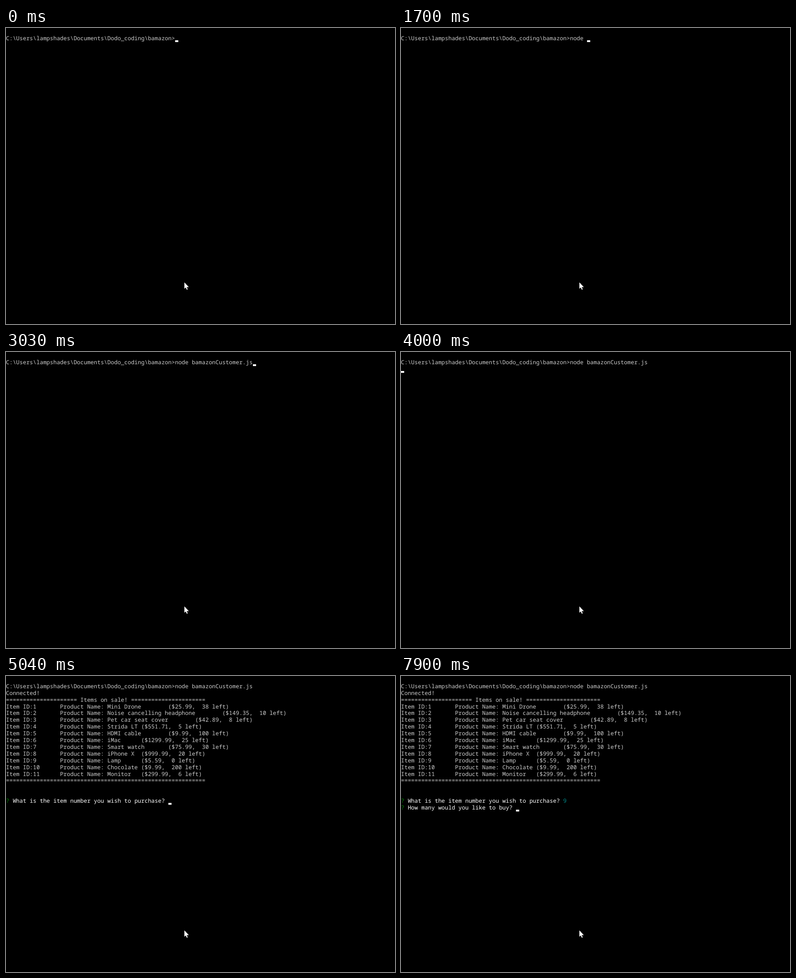
These frames come from a looping animation (857x654 px, 8 s). An HTML page:

```html
<!DOCTYPE html>
<html lang="en">
<head>
<meta charset="utf-8">
<title>Terminal session</title>
<style>
  html, body { margin: 0; width: 100%; height: 100%; overflow: hidden; background: #000; }
  #stage { position: relative; width: 857px; height: 654px; overflow: hidden; background: #000; }
  #screen {
    position: absolute; left: 0; top: 15.804px; margin: 0;
    font: 500 12.42px/14.904px "Noto Sans Mono", "DejaVu Sans Mono", monospace;
    font-variant-ligatures: none; text-rendering: geometricPrecision;
    tab-size: 8; white-space: pre; color: #ccc;
  }
  #caret {
    position: absolute; left: 0; top: 0.9px; width: 7.452px; height: 3.726px; background: #fff;
  }
  .ask { color: #fff; }
  .mark { color: #008a00; }
  .done { color: #008a8a; }
  svg { position: absolute; left: 0; top: 0; }
</style>
</head>
<body>
<div id="stage">
  <pre id="screen"><span id="prompt"></span><span id="command"></span>
<span id="connected">Connected!</span>
<span id="list"></span><span id="question"><span class="mark">?</span> <span class="ask">What is the item number you wish to purchase?</span> </span><span id="answer">9</span>
<span id="amount"><span class="mark">?</span> <span class="ask">How many would you like to buy?</span> </span></pre>
  <div id="caret"></div>
  <svg width="857" height="654">
    <path fill="#fff" d="M393 562V576L396.2 573.3 398.2 578.3 400.4 577.4 398.3 572.5H402.8Z"/>
  </svg>
</div>
<script>
const LOOP = 8000, COL = 7.452, ROW = 14.904, CARET_HEIGHT = 3.726;
const PROMPT = 'C:\\Users\\lampshades\\Documents\\Dodo_coding\\bamazon>';
const COMMAND = 'node bamazonCustomer.js';
const CONNECTED = 5000, LISTED = 5040, ANSWERED = 7140, CONFIRMED = 7800;

const items = [
  ['Mini Drone', '25.99', 38],
  ['Noise cancelling headphone', '149.35', 10],
  ['Pet car seat cover', '42.89', 8],
  ['Strida LT', '551.71', 5],
  ['HDMI cable', '9.99', 100],
  ['iMac', '1299.99', 25],
  ['Smart watch', '75.99', 30],
  ['iPhone X', '999.99', 20],
  ['Lamp', '5.59', 0],
  ['Chocolate', '9.99', 200],
  ['Monitor', '299.99', 6]
];

// [time, characters of the command typed so far]
const typing = [[0, 0], [900, 1], [1010, 2], [1130, 3], [1260, 4], [1600, 5],
  [2430, 6], [2530, 7], [2660, 8], [2900, COMMAND.length]];

// [time, row, column]; row 1 follows the typed command
const moves = [[0, 1, 0], [3670, 2, 0], [CONNECTED, 3, 0], [LISTED, 18, 48],
  [ANSWERED, 18, 49], [CONFIRMED, 19, 34]];

// [time, caret visible]
const blinks = [[0, 1], [360, 0], [900, 1], [1430, 0], [1600, 1], [1950, 0], [2430, 1],
  [3540, 0], [3670, 1], [4070, 0], [4600, 1], [5140, 0], [5670, 1], [6240, 0],
  [6740, 1], [7270, 0], [CONFIRMED, 1]];

const el = id => document.getElementById(id);
const latest = (steps, t) => steps.findLast(step => step[0] <= t);
const show = (id, on) => { el(id).style.visibility = on ? 'visible' : 'hidden'; };
const rule = n => '='.repeat(n);

el('prompt').textContent = PROMPT;
el('list').textContent = [
  `${rule(21)} Items on sale! ${rule(22)}`,
  ...items.map(([name, price, left], i) =>
    `Item ID:${i + 1}\tProduct Name: ${name}\t($${price},  ${left} left)`),
  rule(59), '', '', ''
].join('\n');

function render(t) {
  const typed = latest(typing, t)[1];
  const [, row, column] = latest(moves, t);
  const x = (row === 1 ? PROMPT.length + typed : column) * COL;
  const y = (row + 1) * ROW - CARET_HEIGHT;

  el('command').textContent = COMMAND.slice(0, typed);
  show('connected', t >= CONNECTED);
  show('list', t >= LISTED);
  show('question', t >= LISTED);
  show('answer', t >= ANSWERED);
  el('answer').className = t >= CONFIRMED ? 'done' : '';
  show('amount', t >= CONFIRMED);
  el('caret').style.transform = `translate(${x}px, ${y}px)`;
  show('caret', latest(blinks, t)[1]);
}

const start = performance.now();
function tick() {
  render((performance.now() - start) % LOOP);
  requestAnimationFrame(tick);
}
tick();
</script>
</body>
</html>
```
